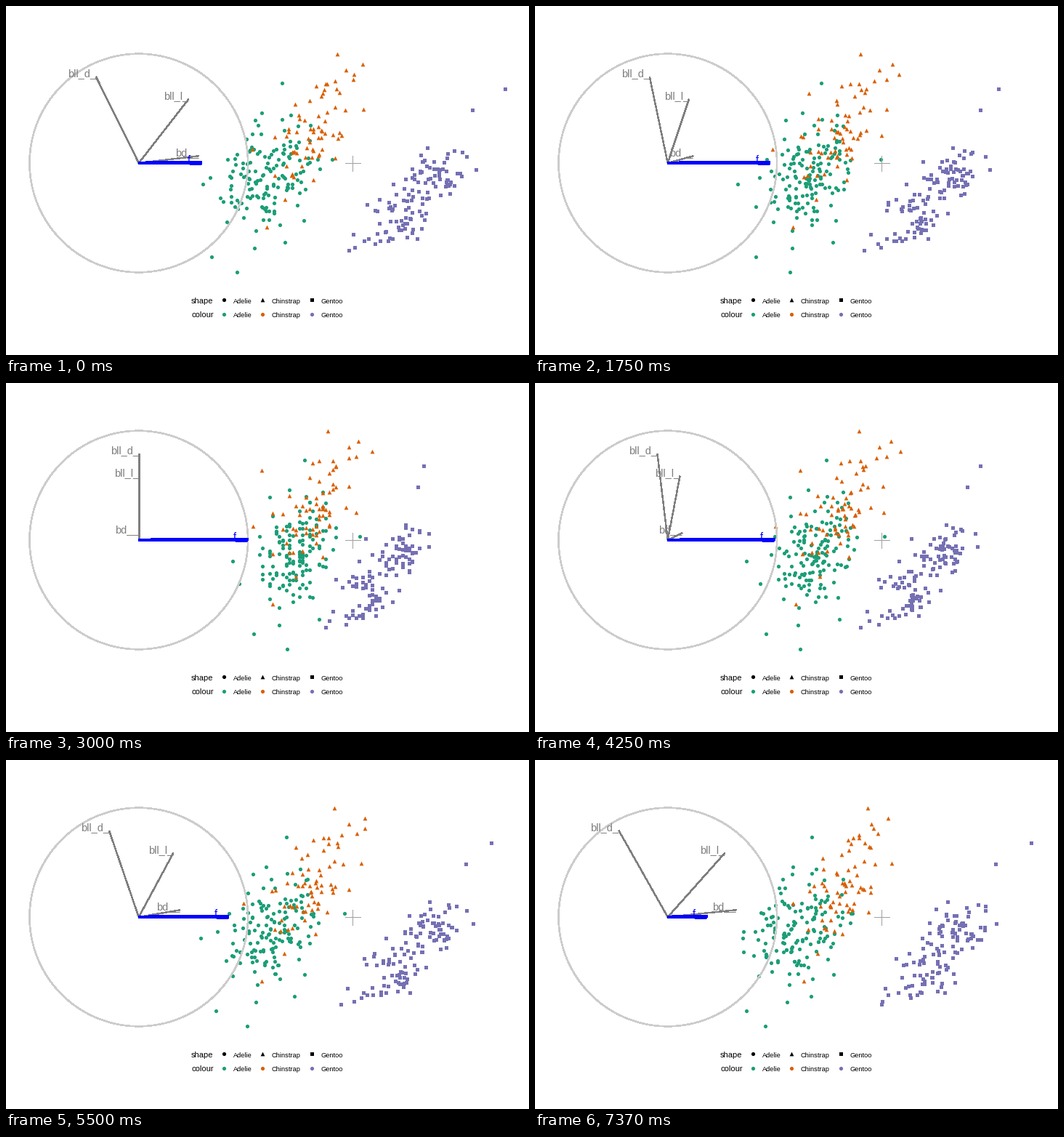
Recreate the animation shown at these times as a matplotlib script. Size 720 by 480 pixels, loop 8 s.

```python
import numpy as np
import matplotlib.pyplot as plt
from matplotlib.animation import FuncAnimation

W, H = 720, 480
LOOP, TICK = 8000, 50                        # ms
START, STEP, BEAT = 0.954, 0.2, 625          # tour angles in radians, ms per step
CENTER = np.array([445.0, 231.0])            # screen position of the data mean
UNIT = 270                                   # pixels per scaled data unit
HUB, RADIUS = (182.75, 216.0), 150.3
GREY, BLUE = "#7f7f7f", "#0000ff"
FONT = "Liberation Sans"

# Variables: bill length, bill depth, body mass, flipper length
MEAN = np.array([44.0, 17.16, 4207, 201])
RANGE = np.array([27.5, 8.4, 3600, 59])
SIDE = np.array([0.56, -0.48, 0.673, 0])     # horizontal axis, flipper excluded
FLIP = np.array([0, 0, 0, 1])
UP = np.array([0.585, 0.79, 0.065, 0.006])   # vertical axis, constant

# Each species: mean and deviation per variable, correlation loading,
# and a few outliers as (x at START, y, x at angle zero)
SPECIES = [
    dict(name="Adelie", color="#1b9e77", marker="o", size=27, count=146,
         mean=(38.8, 18.35, 3706, 190), dev=(2.66, 1.22, 459, 6.5), load=0.55,
         far=[(380, 106, 411), (318, 366, 387), (283, 345, 341),
              (271, 245, 312), (449, 211, 487)]),
    dict(name="Chinstrap", color="#d95f02", marker="^", size=33, count=68,
         mean=(48.8, 18.42, 3733, 195.8), dev=(3.34, 1.14, 384, 7.1), load=0.75,
         far=[(456, 66, 443), (491, 80, 485), (436, 120, 352), (339, 197, 340)]),
    dict(name="Gentoo", color="#7570b3", marker="s", size=25, count=119,
         mean=(47.5, 15.0, 5092, 217.2), dev=(3.1, 0.99, 501, 6.6), load=0.8,
         far=[(687, 114, 575), (642, 143, 567), (527, 270, 454)]),
]


def flock(rng, n, mean, dev, load):
    """Random birds of one species as (side, flipper, y) in pixels."""
    size = 0.85 * rng.choice([-1, 1], n) + 0.5 * rng.normal(size=n)
    own = np.clip(rng.normal(size=(n, 4)), -1.9, 1.9)
    z = load * size[:, None] + np.sqrt(1 - load ** 2) * own
    birds = np.array(mean) + z * np.array(dev)
    birds[:, 3] = np.round(birds[:, 3])      # flippers are whole millimetres
    scaled = (birds - MEAN) / RANGE * UNIT
    return np.c_[scaled @ SIDE, scaled @ FLIP, CENTER[1] - scaled @ UP]


def outliers(rows):
    x, y, x_flat = np.array(rows, float).T
    flip = x_flat - CENTER[0]
    side = (x - CENTER[0] - np.cos(START) * flip) / np.sin(START)
    return np.c_[side, flip, y]


def angle_at(ms):
    """Step down to zero, rest for two beats, then step up again."""
    k = (ms + 150) // BEAT
    return max(START - STEP * k, STEP * (k - 6), 0)


fig = plt.figure(figsize=(W / 72, H / 72), dpi=72, facecolor="white")
ax = fig.add_axes([0, 0, 1, 1])
ax.set_xlim(0, W)
ax.set_ylim(H, 0)
ax.axis("off")


def line(xs, ys, color, width, z):
    return ax.plot(xs, ys, color=color, lw=width, zorder=z,
                   antialiased=False, solid_capstyle="butt")[0]


def dots(x, y, color, marker, size):
    return ax.scatter(x, y, s=size, c=color, marker=marker, linewidths=0,
                      antialiased=False, zorder=2)


def label(x, y, s, size, color="black", ha="left"):
    return ax.text(x, y, s, size=size, color=color, ha=ha, va="baseline",
                   family=FONT, zorder=6)


# Data points
rng = np.random.default_rng(11)
clouds = []
for sp in SPECIES:
    far = outliers(sp["far"])
    near = flock(rng, sp["count"] - len(far), sp["mean"], sp["dev"], sp["load"])
    birds = np.vstack([far, near])
    cloud = dots(birds[:, 0], birds[:, 2], sp["color"], sp["marker"], sp["size"])
    clouds.append((cloud, birds))

# Unit circle and variable axes
t = np.linspace(0, 2 * np.pi, 361)
line(HUB[0] + RADIUS * np.cos(t), HUB[1] + RADIUS * np.sin(t), "#cccccc", 1.6, 3)
arms = [(line([], [], GREY, 1.4, 4), label(0, 0, tag, 14.5, GREY, "right"))
        for tag in ("bll_l_", "bll_d_", "bd__")]
arms.append((line([], [], BLUE, 3.8, 5), label(0, 0, "f__", 14.5, BLUE, "right")))

# Origin cross
line([466.5, 487.5], [216, 216], "#a0a0a0", 1, 4)
line([477, 477], [205.5, 226.5], "#a0a0a0", 1, 4)

# Legends: one row for shapes, one for colours
label(255, 409, "shape", 11.1)
label(255, 428, "colour", 11.1)
for x, sp in zip((299.5, 352.5, 420.5), SPECIES):
    dots([x], [404.3], "black", sp["marker"], sp["size"])
    dots([x], [423.8], sp["color"], "o", 27)
    for y in (409, 428):
        label(x + 13.5, y, sp["name"], 9.3)


def draw(tick):
    a = angle_at(tick * TICK)
    for cloud, birds in clouds:
        side, flip, y = birds.T
        x = CENTER[0] + np.sin(a) * side + np.cos(a) * flip
        cloud.set_offsets(np.c_[x, y])
    across = np.sin(a) * SIDE + np.cos(a) * FLIP
    for (arm, tag), dx, dy in zip(arms, across, UP):
        tip = HUB[0] + RADIUS * dx, HUB[1] - RADIUS * dy
        arm.set_data([HUB[0], tip[0]], [HUB[1], tip[1]])
        tag.set_position(tip)
    return []


anim = FuncAnimation(fig, draw, frames=LOOP // TICK, interval=TICK, repeat=True)
plt.show()
```
